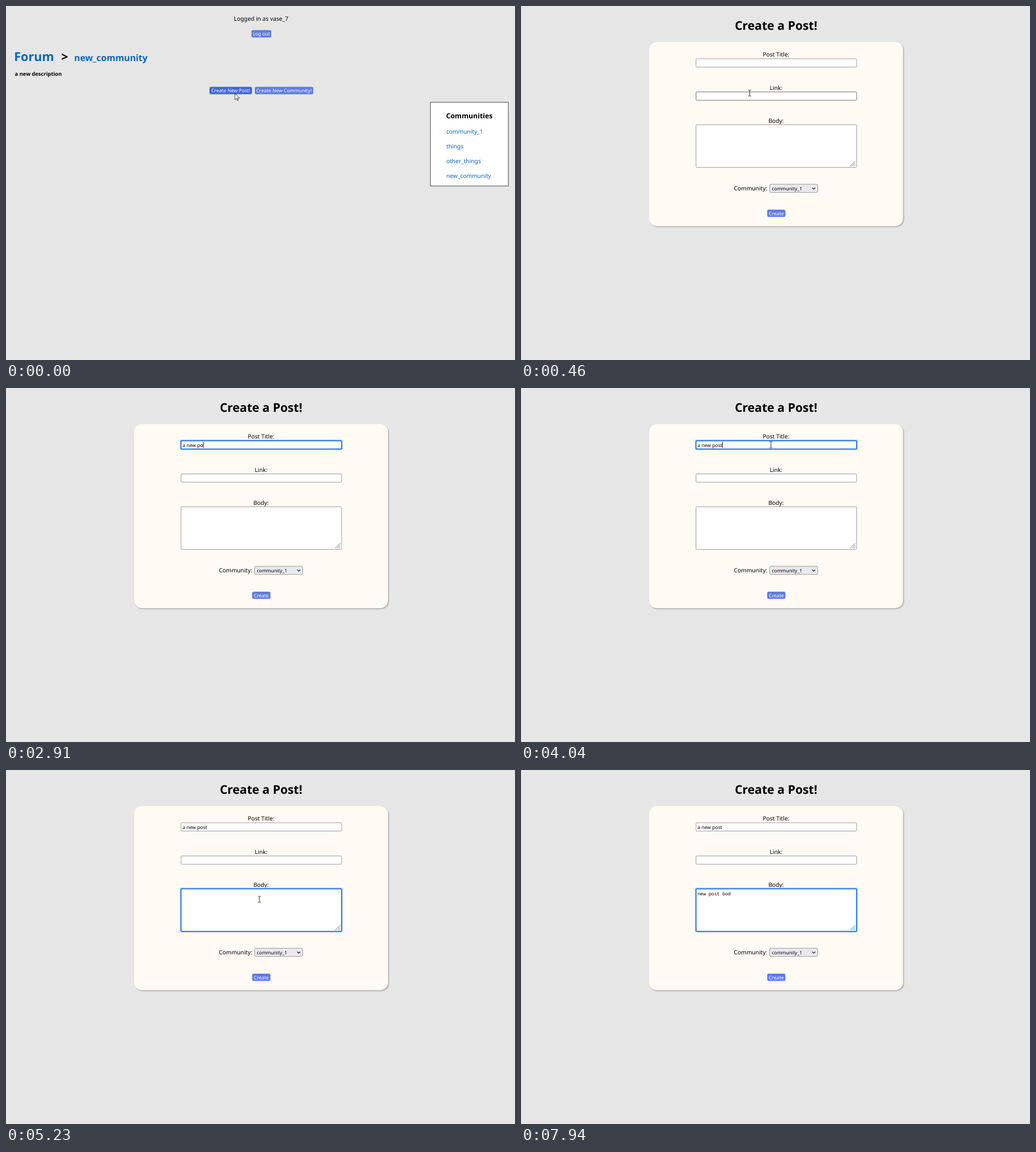
Animation of 898 by 624 pixels, one loop 8000 ms. Source, as an HTML page:

```html
<!DOCTYPE html>
<html lang="en">
<head>
<meta charset="utf-8">
<title>Create a Post</title>
<style>
  html, body { margin: 0; width: 100%; height: 100%; overflow: hidden; background: #e6e6e6; }
  svg { display: block; width: 898px; height: 624px; }
  text { font-family: "Noto Sans", "Open Sans", sans-serif; font-size: 10.28px; white-space: pre; text-rendering: geometricPrecision; }
  .bold { font-weight: 700; }
  .h1 { font-size: 21.2px; }
  .link { fill: #0b62c4; }
  .mid { text-anchor: middle; }
  .small { font-size: 8.57px; }
  .white { fill: #fff; }
  .mono { font-family: "Noto Sans Mono", "DejaVu Sans Mono", monospace; font-size: 8.15px; }
  .btn { fill: #5f7ddc; }
  .field { fill: #fff; stroke: #8f8f9d; stroke-width: .9; }
  .ring { fill: #b5d0f3; }
  .focus { fill: #fff; stroke: #0a60dc; stroke-width: 1.5; }
</style>
</head>
<body>
<svg viewBox="0 0 898 624">
  <defs>
    <filter id="blur"><feGaussianBlur stdDeviation="1"/></filter>
  </defs>
  <rect width="898" height="624" fill="#e6e6e6"/>

  <g id="forum">
    <text class="mid" x="450" y="26.4">Logged in as vase_7</text>
    <rect class="btn" x="433" y="42.4" width="35" height="13" rx="2.8"/>
    <text class="mid small white" x="450.5" y="52.2">Log out</text>
    <g class="bold">
      <text class="h1" x="14.2" y="97" fill="#0066cc" style="font-size:21.7px">Forum</text>
      <text class="h1" x="97.6" y="97">&gt;</text>
      <text x="120.3" y="97" fill="#0066cc" style="font-size:15.75px">new_community</text>
      <text x="15.6" y="122.5" style="font-size:9.35px">a new description</text>
    </g>
    <rect x="359" y="142.5" width="75" height="13" rx="2.8" fill="#4468cf"/>
    <text class="mid small white" x="396.4" y="152.3">Create New Post!</text>
    <rect class="btn" x="439" y="142.5" width="103" height="13" rx="2.8"/>
    <text class="mid small white" x="490.3" y="152.3">Create New Community!</text>
    <rect x="748.7" y="169.7" width="137.5" height="147.6" fill="#fff" stroke="#77777b" stroke-width="1.4"/>
    <text class="bold" x="776.4" y="197.5" style="font-size:12.3px">Communities</text>
    <g id="links" class="link"></g>
  </g>

  <g id="form">
    <text class="mid bold h1" x="450" y="42.3">Create a Post!</text>
    <rect x="227.4" y="65.2" width="448" height="324.4" rx="13.7" fill="#a8a8a8" filter="url(#blur)"/>
    <rect x="226" y="63.5" width="448" height="324.5" rx="13.7" fill="#fffaf3"/>
    <text class="mid" x="450" y="89">Post Title:</text>
    <text class="mid" x="450" y="147.5">Link:</text>
    <text class="mid" x="450" y="206">Body:</text>
    <g id="fields"></g>
    <path d="M580.8 282.4L589.6 273.6M584 282.4L589.6 276.8M587.2 282.4L589.6 280" stroke="#555" stroke-width=".8" fill="none"/>
    <text id="title" class="small" x="311.4" y="103.5"></text>
    <text id="body" class="mono" x="311.4" y="220.6"></text>
    <rect id="caret" width="1" height="10.6"/>
    <text x="375.6" y="325">Community:</text>
    <rect x="438.5" y="314.2" width="85" height="14.4" rx="2.6" fill="#e9e9ed" stroke="#8f8f9d" stroke-width=".9"/>
    <text x="442.5" y="325" style="font-size:8.45px">community_1</text>
    <path d="M513.8 320.3l2.7 2.7 2.7-2.7" fill="none" stroke="#111" stroke-width="1.2"/>
    <rect class="btn" x="434.3" y="359" width="32.2" height="12.7" rx="2.8"/>
    <text class="mid small white" x="450.4" y="368.7">Create</text>
  </g>

  <circle id="click" r="8.2" fill="#f2ec4b" fill-opacity=".62"/>
  <path id="arrow" d="M0 0V11.2L2.6 8.8 4.3 12.7 6 12 4.3 8.2H7.7Z" fill="#fff" stroke="#111" stroke-width=".8"/>
  <path id="beam" d="M-2.5 -5.2H-.7L0 -4.6 .7 -5.2H2.5M0 -4.6V4.6M-2.5 5.2H-.7L0 4.6 .7 5.2H2.5" fill="none" stroke="#222" stroke-width=".95"/>
</svg>
<script>
const LOOP = 8000, TICK = 66.17;
const OPEN = 460, FOCUS_TITLE = 1190, FOCUS_BODY = 4630;
const $ = id => document.getElementById(id);
const within = (v, a, b) => v >= a && v < b;
const show = (el, on) => el.setAttribute("visibility", on ? "inherit" : "hidden");

function add(parent, tag, attrs) {
  const el = document.createElementNS("http://www.w3.org/2000/svg", tag);
  for (const k in attrs) el.setAttribute(k, attrs[k]);
  return parent.appendChild(el);
}

["community_1", "things", "other_things", "new_community"].forEach((name, i) => {
  add($("links"), "text", { x: 776.7, y: 225.4 + i * 25.75 }).textContent = name;
});

// Each field: top edge, height, and the span of time it holds focus.
const fields = [
  { y: 93, h: 14.6, from: FOCUS_TITLE, to: FOCUS_BODY },
  { y: 151.5, h: 14.6, from: 0, to: 0 },
  { y: 209.4, h: 75, from: FOCUS_BODY, to: LOOP }
];
for (const f of fields) {
  const box = (cls, grow, rx) => add($("fields"), "rect", {
    class: cls, x: 308.8 - grow, y: f.y - grow,
    width: 283.2 + 2 * grow, height: f.h + 2 * grow, rx
  });
  f.plain = box("field", 0, 1.4);
  f.ring = box("ring", 2.2, 3);
  f.focus = box("focus", 0, 1.4);
}

const title = {
  el: $("title"), text: "a new post", caretY: 95,
  keys: [1660, 1860, 2190, 2380, 2520, 2580, 2720, 2910, 3050, 3110]
};
const body = {
  el: $("body"), text: "new post bod", caretY: 212.2,
  keys: [5430, 5560, 5630, 5760, 5960, 6020, 6220, 6350, 6480, 7670, 7740, 7870]
};
const caretOff = [[3250, 3840], [4370, FOCUS_BODY], [5230, 5430], [6880, 7410], [7940, LOOP]];
const presses = [[330, OPEN], [1190, 1390], [4570, 4700]];

const arrowPath = [[130, 404, 154], [330, 402, 152]];
const beamPath = [
  [660, 403.5, 153.5], [1190, 441, 100], [4040, 441, 100],
  [4430, 453.5, 229], [4570, 447, 228]
];

function along(path, t) {
  if (t <= path[0][0]) return path[0].slice(1);
  for (let i = 1; i < path.length; i++) {
    const [t0, x0, y0] = path[i - 1], [t1, x1, y1] = path[i];
    if (t < t1) {
      const u = (t - t0) / (t1 - t0), e = u * u * (3 - 2 * u);
      return [x0 + (x1 - x0) * e, y0 + (y1 - y0) * e];
    }
  }
  return path[path.length - 1].slice(1);
}

function type(input, t) {
  const n = input.keys.filter(k => k <= t).length;
  input.el.textContent = input.text.slice(0, n);
  return n;
}

function draw(t) {
  const onForm = t >= OPEN;
  const tick = Math.floor((t + 5) / TICK) * TICK;
  const [x, y] = along(onForm ? beamPath : arrowPath, tick);
  const hidden = within(t, 1720, 4040) || t >= 5500;
  const place = `translate(${x} ${y})`;

  show($("forum"), !onForm);
  show($("form"), onForm);
  show($("arrow"), !onForm);
  show($("beam"), onForm && !hidden);
  show($("click"), presses.some(([a, b]) => within(t, a, b)));
  for (const id of ["arrow", "beam", "click"]) $(id).setAttribute("transform", place);

  for (const f of fields) {
    const focused = within(t, f.from, f.to);
    const hover = !hidden && within(y, f.y, f.y + f.h);
    f.plain.style.stroke = hover ? "#62626e" : "";
    show(f.ring, focused);
    show(f.focus, focused);
  }

  type(title, t);
  type(body, t);
  const active = t < FOCUS_BODY ? title : body;
  const width = active.el.textContent ? active.el.getComputedTextLength() : 0;
  $("caret").setAttribute("x", 311.3 + width);
  $("caret").setAttribute("y", active.caretY);
  show($("caret"), t >= FOCUS_TITLE && !caretOff.some(([a, b]) => within(t, a, b)));
}

const start = performance.now();
function frame() {
  draw((performance.now() - start) % LOOP);
  requestAnimationFrame(frame);
}
frame();
</script>
</body>
</html>
```
